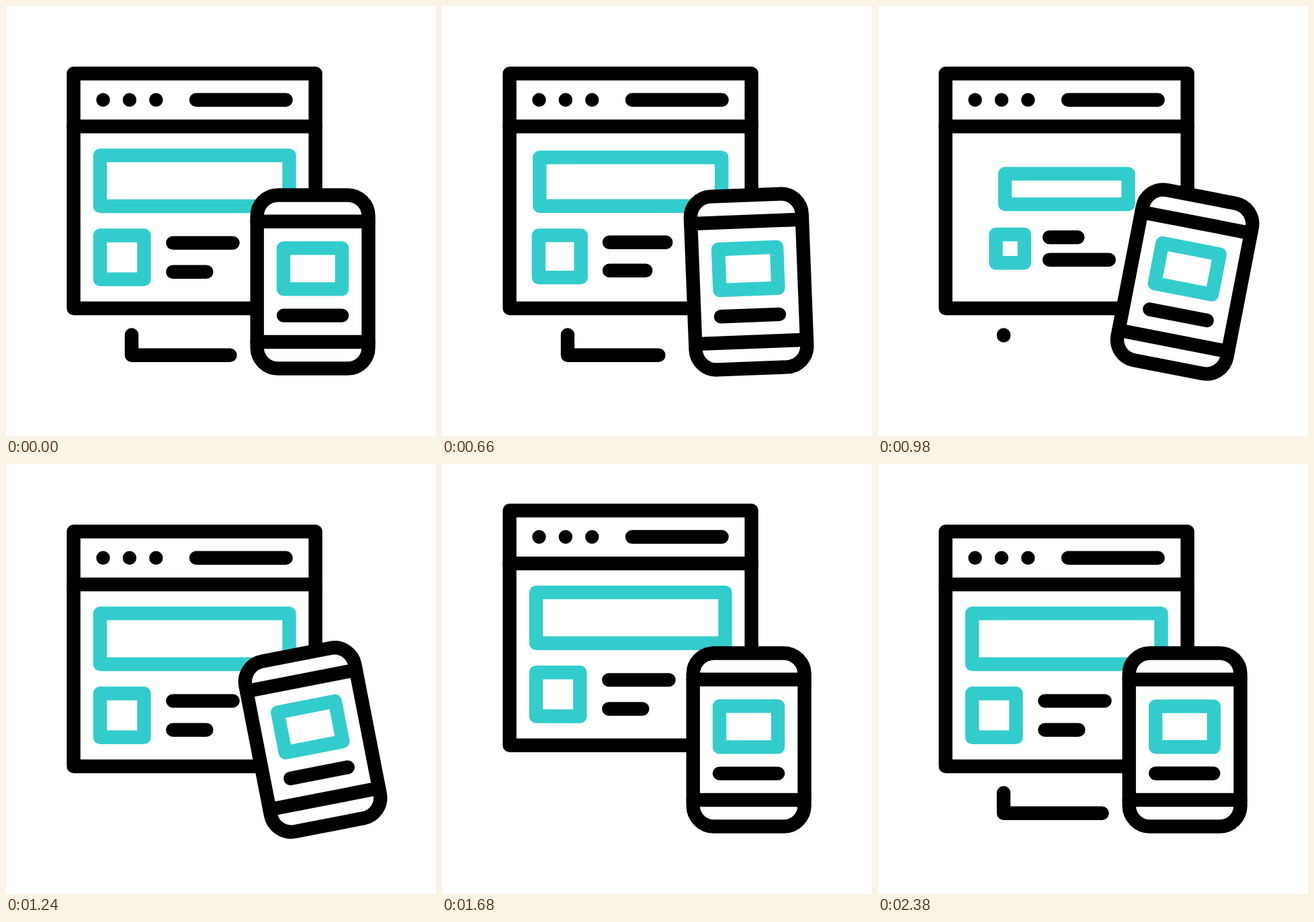
An HTML page for the animation above (2400 ms loop, 640 by 640 pixels).

```html
<!DOCTYPE html>
<html lang="en">
<head>
<meta charset="utf-8">
<title>Responsive layout icon</title>
<style>
  html, body { margin: 0; width: 100%; height: 100%; overflow: hidden; background: #fff; }
  svg { display: block; width: 100vw; height: 100vh; }
  .ink { fill: none; stroke: #000; stroke-width: 20.4; stroke-linecap: round; stroke-linejoin: round; }
  .accent { stroke: #3cc; }
  .solid { fill: #fff; }
</style>
</head>
<body>
<svg viewBox="0 0 640 640">
  <g class="ink">
    <path id="foot" d="M187 489.5V519.8H333.5"/>
    <g id="browser">
      <path class="solid" d="M100.6 100.5H460.6V450H100.6Z"/>
      <path d="M100.6 179.3H460.6M283 139.8H416.6M144.5 139.8h.01M183.9 139.8h.01M223.3 139.8h.01"/>
      <path id="banner" class="accent"/>
      <path id="thumb" class="accent"/>
      <path id="textA"/>
      <path id="textB"/>
    </g>
    <g id="phone">
      <rect class="solid" x="373.7" y="281.5" width="165.8" height="258" rx="31"/>
      <path d="M373.7 320.8H539.5M373.7 500H539.5"/>
      <path id="card" class="accent"/>
      <path id="caption"/>
    </g>
  </g>
</svg>
<script>
  const LOOP = 2400;
  const el = id => document.getElementById(id);

  // Each track is a list of [time, value]; values ease in and out between steps.
  const tracks = {
    lift:    [[200, 0], [402, -42], [604, 0]],
    tilt:    [[606, 0], [806, -12], [1006, 12], [1206, -12], [1406, 0]],
    hop:     [[1394, 0], [1600, -47.5], [1806, 0]],
    page:    [[605, 0], [905, 1], [1205, 0]],
    screen:  [[1800, 0], [2100, 1], [2400, 0]],
    footLen: [[600, 176.8], [1000, 0], [1800, 0], [2067, 176.8]]
  };

  // Boxes: left, top, right, bottom. Lines: left, y, right.
  const shapes = [
    { id: 'banner',  by: 'page',   from: [140, 222.4, 421.5, 298],   to: [198.3, 254.8, 363.2, 294.6] },
    { id: 'thumb',   by: 'page',   from: [140, 341.5, 205.4, 406.8], to: [182.2, 339.8, 220.2, 377.6] },
    { id: 'textA',   by: 'page',   from: [248.3, 352.6, 337.6],      to: [256.3, 342.6, 289.6] },
    { id: 'textB',   by: 'page',   from: [248.3, 395.7, 298.3],      to: [256.3, 374.4, 352.5] },
    { id: 'card',    by: 'screen', from: [413, 360.4, 500, 421.4],   to: [430.2, 377.6, 482.8, 413.7] },
    { id: 'caption', by: 'screen', from: [413, 460.6, 500],          to: [430.2, 448.8, 433.3] }
  ];

  function sample(steps, t) {
    if (t <= steps[0][0]) return steps[0][1];
    for (let i = 1; i < steps.length; i++) {
      const [t0, a] = steps[i - 1], [t1, b] = steps[i];
      if (t < t1) {
        const k = (t - t0) / (t1 - t0);
        return a + (b - a) * k * k * (3 - 2 * k);
      }
    }
    return steps[steps.length - 1][1];
  }

  function outline([left, top, right, bottom]) {
    return `M${left} ${top}H${right}` + (bottom === undefined ? '' : `V${bottom}H${left}Z`);
  }

  function draw(t) {
    const at = name => sample(tracks[name], t);
    for (const { id, by, from, to } of shapes) {
      const k = at(by);
      el(id).setAttribute('d', outline(from.map((v, i) => v + (to[i] - v) * k)));
    }
    el('browser').setAttribute('transform', `translate(0 ${at('hop')})`);
    el('phone').setAttribute('transform', `translate(0 ${at('lift')}) rotate(${at('tilt')} 456.6 410.5)`);
    const len = at('footLen');
    el('foot').setAttribute('stroke-dasharray', `${len} 999`);
    el('foot').setAttribute('visibility', len > 0 ? 'visible' : 'hidden');
  }

  const start = performance.now();
  function tick() {
    draw((performance.now() - start) % LOOP);
    requestAnimationFrame(tick);
  }
  tick();
</script>
</body>
</html>
```
